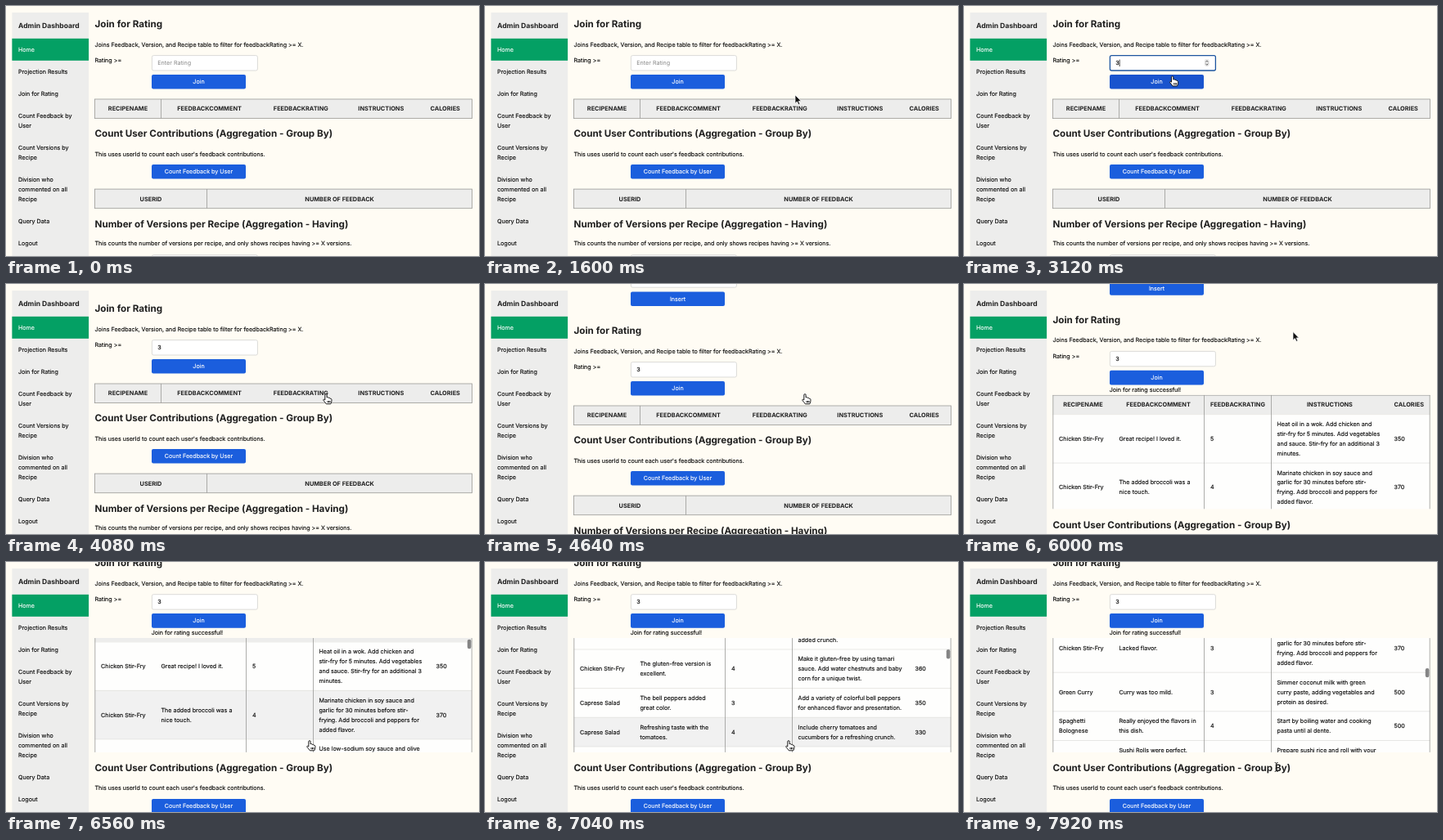
An HTML page for the animation above (8 s loop, 578x306 px).

```html
<!DOCTYPE html>
<html lang="en">
<head>
<meta charset="utf-8">
<title>Admin Dashboard</title>
<style>
html, body { margin: 0; width: 100%; height: 100%; overflow: hidden; background: #fffcf4; }
svg { display: block; }
text {
  font: 400 7.14px Inter, "Open Sans", sans-serif;
  font-feature-settings: "calt" 0;
  text-rendering: geometricPrecision;
  white-space: pre;
  fill: #080808;
  stroke: #080808;
  stroke-width: .14;
}
.h, .brand, .th { font-weight: 700; fill: #202020; stroke: none; }
.h { font-size: 11.67px; }
.brand { font-size: 8.57px; }
.th { font-size: 7.34px; text-anchor: middle; }
.btn { fill: #1b5edd; }
.on { fill: #fff; stroke: #fff; }
.mid { text-anchor: middle; }
.hint { fill: #858585; stroke: none; }
.input { fill: #fff; stroke: #d2d2d0; stroke-width: .8; }
.focus { stroke: #1d559f; stroke-width: 1.3; }
.hover { fill: #1954ce; }
.head { fill: #ededec; }
.line { stroke: #9a9a97; stroke-width: .8; fill: none; }
.rule { stroke: #dededc; stroke-width: .7; }
.row { fill: #fefefd; }
.row.lit { fill: #f1f1f1; }
</style>
</head>
<body>
<svg id="stage" width="578" height="306" viewBox="0 0 578 306"></svg>
<script>
const LINE = 11.9, PAD = 5.95, LEFT = 108.5, RIGHT = 569.5;
const TABLE_TOP = 114, HEAD = 23.6, VIEW = 139.8, GROWTH = 116.8;

const rect = (x, y, w, h, cls, extra = '') =>
  `<rect x="${x}" y="${y}" width="${w}" height="${h}" class="${cls}" ${extra}/>`;
const text = (x, y, str, cls = '') => `<text x="${x}" y="${y}" class="${cls}">${str.replace(/>/g, '&gt;')}</text>`;
const line = (x1, y1, x2, y2, cls = 'line') => `<path d="M${x1} ${y1}L${x2} ${y2}" class="${cls}"/>`;
const group = (id, body, extra = '') => `<g id="${id}" ${extra}>${body}</g>`;
// Lines of text centred vertically on cy
const lines = (x, cy, str, cls) => {
  const parts = str.split('|');
  return parts.map((s, i) => text(x, cy + 2.6 + (i - (parts.length - 1) / 2) * LINE, s, cls)).join('');
};
const button = (y, label, id = '') =>
  rect(178, y, 115, 17.6, 'btn', `rx="2" ${id && `id="${id}"`}`) + text(235.5, y + 11.3, label, 'on mid');
const input = (y, id = '') => rect(178.4, y, 129, 18.4, 'input', `rx="2" ${id && `id="${id}"`}`);
const headRow = (y, cells) =>
  rect(LEFT, y, RIGHT - LEFT, HEAD, 'head') + cells.map(([x, s]) => text(x, y + 14.4, s, 'th')).join('');

const fields = ['RECIPENAME', 'FEEDBACKCOMMENT', 'FEEDBACKRATING', 'INSTRUCTIONS', 'CALORIES'];
const heads = xs => xs.map((x, i) => [x, fields[i]]);

const marinate = 'Marinate chicken in soy sauce and|garlic for 30 minutes before stir-|frying. Add broccoli and peppers for|added flavor.';
const recipes = [
  ['Chicken Stir-Fry', 'Great recipe! I loved it.', '5', 'Heat oil in a wok. Add chicken and|stir-fry for 5 minutes. Add vegetables|and sauce. Stir-fry for an additional 3|minutes.', '350'],
  ['Chicken Stir-Fry', 'The added broccoli was a|nice touch.', '4', marinate, '370'],
  ['Chicken Stir-Fry', 'Healthier and still tasty.', '4', 'Use low-sodium soy sauce and olive|oil. Toss in roasted cashews for an|added crunch.', '340'],
  ['Chicken Stir-Fry', 'The gluten-free version is|excellent.', '4', 'Make it gluten-free by using tamari|sauce. Add water chestnuts and baby|corn for a unique twist.', '360'],
  ['Caprese Salad', 'The bell peppers added|great color.', '3', 'Add a variety of colorful bell peppers|for enhanced flavor and presentation.', '350'],
  ['Caprese Salad', 'Refreshing taste with the|tomatoes.', '4', 'Include cherry tomatoes and|cucumbers for a refreshing crunch.', '330'],
  ['Caprese Salad', 'Simple and fresh.', '5', 'Slice tomatoes and mozzarella. Layer|with basil leaves and drizzle with|olive oil.', '320'],
  ['Green Curry', 'Rich and creamy sauce.', '5', 'Simmer coconut milk with green|curry paste, adding vegetables and|protein as desired.', '500'],
  ['Spaghetti|Bolognese', 'A family favorite.', '4', 'Brown the beef with onions and|garlic. Add tomatoes and simmer for|30 minutes.', '520'],
  ['Chicken Stir-Fry', 'Lacked flavor.', '3', marinate, '370'],
  ['Green Curry', 'Curry was too mild.', '3', 'Simmer coconut milk with green|curry paste, adding vegetables and|protein as desired.', '500'],
  ['Spaghetti|Bolognese', 'Really enjoyed the flavors in|this dish.', '4', 'Start by boiling water and cooking|pasta until al dente.', '500'],
  ['Sushi Rolls', 'Sushi Rolls were perfect.|Loved them.', '5', 'Prepare sushi rice and roll with your|favorite fillings.', '400']
];
const cols = [116, 189.5, 301, 382.5, 525.5];

const rowBox = [];
function recipeRows() {
  let y = 23.8, out = '';
  for (const r of recipes) {
    const h = Math.max(...r.map(s => s.split('|').length)) * LINE + 2 * PAD;
    rowBox.push([y, y + h]);
    out += rect(LEFT, y, RIGHT - LEFT, h, 'row') + line(LEFT, y, RIGHT, y, 'rule') +
      r.map((s, i) => lines(cols[i], y + h / 2, s)).join('');
    y += h;
  }
  return out + headRow(0, heads([145.5, 237.5, 334.5, 447, 543.8])) + line(LEFT, .4, RIGHT, .4);
}

const emptyTable = headRow(TABLE_TOP, heads([149, 248.6, 360.3, 458.3, 536.7])) +
  rect(LEFT, TABLE_TOP, RIGHT - LEFT, HEAD, 'line') + line(189.5, TABLE_TOP, 189.5, TABLE_TOP + HEAD);

const fullTable = text(177.7, 110.2, 'Join for rating successful!') +
  `<svg x="0" y="${TABLE_TOP}" width="578" height="${VIEW}">` + group('rows', recipeRows()) +
  [LEFT + .3, 293.5, 375.5, RIGHT - .3].map(x => line(x, 0, x, VIEW)).join('') +
  rect(563.8, 0, 4.6, 11.4, '', 'id="thumb" rx="2.3" fill="#858585"') + '</svg>';

const rest = text(LEFT, 160.2, 'Count User Contributions (Aggregation - Group By)', 'h') +
  text(LEFT, 183.5, 'This uses userId to count each user\'s feedback contributions.') +
  button(194, 'Count Feedback by User') +
  headRow(224.1, [[177, 'USERID'], [407.6, 'NUMBER OF FEEDBACK']]) +
  rect(LEFT, 224.1, RIGHT - LEFT, HEAD, 'line') + line(245.5, 224.1, 245.5, 224.1 + HEAD) +
  text(LEFT, 270.6, 'Number of Versions per Recipe (Aggregation - Having)', 'h') +
  text(LEFT, 293.4, 'This counts the number of versions per recipe, and only shows recipes having >= X versions.') +
  input(304.7);

const spinner = `<g id="spin"><rect x="293.8" y="65" width="6" height="9" rx="2.4" fill="#e6e6e6"/>
  <path d="M295.3 68.6l1.5-1.7 1.5 1.7M295.3 70.6l1.5 1.7 1.5-1.7" fill="none" stroke="#444" stroke-width=".8"/></g>`;

const page = input(-49.2) + button(-25.6, 'Insert') +
  text(LEFT, 26.1, 'Join for Rating', 'h') +
  text(LEFT, 49.6, 'Joins Feedback, Version, and Recipe table to filter for feedbackRating >= X.') +
  text(LEFT, 69.1, 'Rating >=') + input(60.6, 'field') +
  group('hint', text(185.3, 72.3, 'Enter Rating', 'hint')) +
  group('typed', text(185.3, 72.3, '3')) +
  rect(0, 65.6, .8, 8.4, '', 'id="caret" fill="#111"') + spinner +
  button(84, 'Join', 'join') +
  group('empty', emptyTable) + group('full', fullTable) + group('rest', rest);

const menu = [[80.3, 'Projection Results'], [107.3, 'Join for Rating'], [140.2, 'Count Feedback by|User'],
  [179.2, 'Count Versions by|Recipe'], [224.2, 'Division who|commented on all|Recipe'], [263.3, 'Query Data'], [290, 'Logout']];
const sidebar = rect(7.4, 8, 93.7, 298, 'head') + rect(7.4, 39.8, 93.7, 27, '', 'fill="#04a064"') +
  text(15, 27, 'Admin Dashboard', 'brand') + lines(15, 53.4, 'Home', 'on') +
  menu.map(([y, s]) => lines(15, y, s)).join('');

const cursors =
  `<path id="hand" d="M-1.2 7V.8Q-1.2-.3 0-.3Q1.1-.3 1.1.8V4Q1.5 3.3 2.4 3.6Q3.2 3.8 3.3 4.5Q4 3.9 4.8 4.5Q5.2 4.8 5.3 5.4Q6.5 5 6.9 6.2V8.5Q6.7 10 5.8 11.8H.3Q-1 9.8-3 7.6Q-3.6 6.6-2.7 6.2Q-2 6-1.2 7ZM2 8V10.3M3.5 8V10.3M5 8V10.3" fill="#fff" stroke="#111" stroke-width=".95"/>
  <path id="arrow" d="M0 0V10.2L2.4 8L4.1 11.8L5.8 11L4.2 7.4H7.3Z" fill="#111" stroke="#fff" stroke-width=".7"/>
  <path id="beam" d="M-2-5.5Q0-5.5 0-4.2Q0-5.5 2-5.5M0-4.5V4.5M-2 5.5Q0 5.5 0 4.2Q0 5.5 2 5.5M-1.1 1.8H1.1" fill="none" stroke="#222" stroke-width=".9"/>`;

const stage = document.getElementById('stage');
stage.innerHTML = rect(0, 0, 578, 306, '', 'fill="#fffcf4"') + group('page', page) + sidebar + group('cursor', cursors);
const $ = id => document.getElementById(id);
const rowRects = stage.querySelectorAll('.row');

// Timelines: [ms, value...]
const scrollKeys = [[3920, 0], [4160, 12], [4400, 30], [4560, 35], [5120, 35], [5440, 21.8], [6000, 21.8], [6160, -8], [6320, -20.9]];
const innerKeys = [[6400, 0], [6560, 19], [6800, 82], [7040, 176.5], [7200, 290], [7360, 420], [7440, 455], [7520, 469.6]];
const pointerKeys = [
  [320, 566, 126, 'hand'], [400, 452, 123, 'hand'], [480, 378, 122, 'hand'], [720, 378, 122, 'hand'],
  [1520, 381, 116, 'hand'], [1600, 379, 109, 'arrow'], [1840, 305, 76, 'arrow'], [1920, 282, 72, 'beam'],
  [2160, 270, 70, 'beam'], [2800, 266, 71, 'beam'], [2960, 256, 86, 'hand'], [3120, 254.7, 86.2, 'hand'],
  [3520, 255, 87, 'hand'], [3680, 300, 105, 'arrow'], [3840, 362, 124, 'hand'], [3920, 391, 135, 'hand'],
  [4720, 391, 135, 'hand'], [4800, 391, 134, 'arrow'], [5200, 392, 120, 'arrow'], [5600, 402, 58.5, 'arrow'],
  [6240, 402, 58.5, 'arrow'], [6400, 371, 219, 'hand'], [7600, 371, 219, 'hand'], [7680, 372, 221, 'hand'],
  [7760, 375, 230, 'hand'], [7840, 380, 244, 'arrow'], [7920, 381.7, 251, 'beam']];

function at(keys, t, i = 1) {
  let a = keys[0];
  for (const b of keys) {
    if (t < b[0]) return b === a ? a[i] : a[i] + (b[i] - a[i]) * (t - a[0]) / (b[0] - a[0]);
    a = b;
  }
  return a[i];
}
const show = (id, on) => $(id).style.display = on ? '' : 'none';
const move = (id, x, y) => $(id).setAttribute('transform', `translate(${x} ${y})`);

function draw(t) {
  const focused = t >= 2160 && t < 3280, typed = t >= 2720, loaded = t >= 4960;
  const scroll = at(scrollKeys, t), inner = at(innerKeys, t);
  const x = at(pointerKeys, t), y = at(pointerKeys, t, 2);
  const kind = pointerKeys.reduce((k, p) => p[0] <= t ? p[3] : k, '');

  move('page', 0, scroll);
  move('rest', 0, loaded ? GROWTH : 0);
  move('rows', 0, -inner);
  show('empty', !loaded);
  show('full', loaded);
  show('hint', !typed);
  show('typed', typed);
  show('caret', focused);
  show('spin', focused);
  $('caret').setAttribute('x', typed ? 189.7 : 185);
  $('field').classList.toggle('focus', focused);
  $('join').classList.toggle('hover', t >= 2960 && t < 3680);
  show('thumb', t >= 6480);
  $('thumb').setAttribute('y', .2 + inner * .078);

  const probe = y - 2.5 - scroll - TABLE_TOP + inner;
  const over = loaded && kind === 'hand' && y < TABLE_TOP + scroll + VIEW;
  rowRects.forEach((r, i) => r.classList.toggle('lit', over && probe >= rowBox[i][0] && probe < rowBox[i][1]));

  move('cursor', x, y);
  for (const k of ['hand', 'arrow', 'beam']) show(k, k === kind);
}

const STEP = 80, LOOP = 8000;
function tick() {
  draw(Math.floor(performance.now() % LOOP / STEP) * STEP);
  requestAnimationFrame(tick);
}
tick();
</script>
</body>
</html>
```
